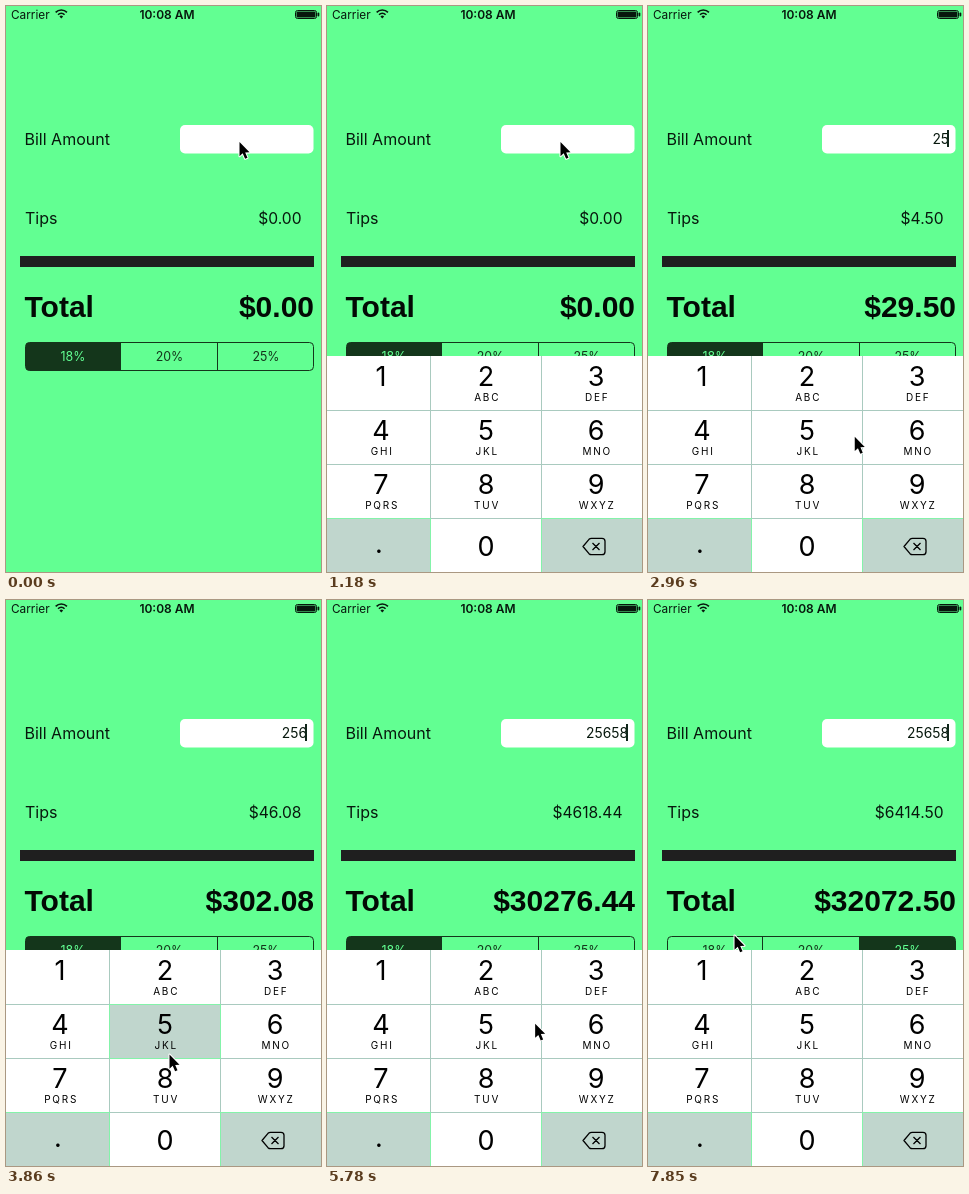
Animation of 315 by 566 pixels, one loop 7990 ms. Source, as an HTML page with a canvas:

```html
<!DOCTYPE html>
<html lang="en">
<head>
<meta charset="utf-8">
<title>Tip calculator</title>
<style>
html, body { margin: 0; width: 100%; height: 100%; overflow: hidden; background: #62ff92; }
canvas { display: block; width: 315px; height: 566px; }
</style>
</head>
<body>
<canvas id="stage" width="315" height="566"></canvas>
<script>
const W = 315, H = 566, LOOP = 7990;
const ctx = document.getElementById('stage').getContext('2d');
const SANS = 'Inter, Roboto, sans-serif';
const BOLD = '"Liberation Sans", Arial, sans-serif';
const GREEN = '#62ff92', INK = '#07180d', DARK = '#14361b', GREY = '#c0d6cd', LINE = '#a9cabf';

const KEYS = ['1', '2 ABC', '3 DEF', '4 GHI', '5 JKL', '6 MNO', '7 PQRS', '8 TUV', '9 WXYZ', '.', '0', ''];
const COLS = [0, 103, 214, 315], MIDS = [54, 159, 269];
const KB_TOP = 350, ROW = 54;

const SEG_X = [19.5, 114.5, 211.5, 307.5], SEG_MID = [67, 163.5, 260], RATES = [18, 20, 25];

// [time down, key]; the digit lands when the key is let go
const TAPS = [[2065, '2'], [2655, '5'], [3255, '6'], [3855, '5'], [4295, '8']];
const HOLD = 145;
const RATE_TAPS = [[6205, 1], [7105, 2]];

// pointer: time, x, y
const PATH = [
  [1400, 233.5, 136], [1960, 171.5, 372], [2240, 171.5, 372], [2600, 163, 430],
  [2780, 163, 430], [3180, 268, 432], [3400, 268, 432], [3690, 163.5, 454.5],
  [3980, 163.5, 454.5], [4250, 165, 487], [4430, 168, 487], [4600, 217, 488],
  [4890, 254, 518], [5180, 258, 525], [5450, 258, 525], [6050, 168, 342],
  [6230, 168, 342], [6760, 269.5, 338], [6940, 271, 345], [7090, 271, 345],
  [7700, 95.5, 335], [7850, 86.5, 335.5]
];

const STEP = 148.1, FIRST = 440;
function sample(t) {
  const n = Math.floor((t - FIRST + 10) / STEP);
  return n < 0 ? 0 : FIRST + n * STEP;
}

function pointerAt(t) {
  let a = PATH[0];
  for (const b of PATH) {
    if (t < b[0]) {
      if (a === b) break;
      const u = (t - a[0]) / (b[0] - a[0]), e = u * u * (3 - 2 * u);
      return [a[1] + (b[1] - a[1]) * e, a[2] + (b[2] - a[2]) * e];
    }
    a = b;
  }
  return [a[1], a[2]];
}

function stateAt(t) {
  const now = t + 12;
  let bill = '', pressed = null, seg = 0, typed = 590;
  for (const [down, key] of TAPS) {
    if (now >= down + HOLD) { bill += key; typed = down + HOLD; }
    else if (now >= down) pressed = key;
  }
  for (const [at, i] of RATE_TAPS) if (now >= at) seg = i;
  const slide = t < FIRST ? 216 : 216 * Math.exp(-(t - 400) / 90);
  return {
    bill, pressed, seg,
    slide: slide < 0.5 ? 0 : Math.round(slide),
    caret: t >= FIRST && (now < 590 || (now - typed) % 1040 < 575),
    pointer: pointerAt(t)
  };
}

function text(str, x, y, size, opt = {}) {
  const { weight = 400, align = 'left', color = INK, family = SANS, gap = 0 } = opt;
  ctx.font = `${weight} ${size}px ${family}`;
  ctx.textAlign = align;
  ctx.fillStyle = color;
  ctx.letterSpacing = gap + 'px';
  ctx.fillText(str, x, y);
  ctx.letterSpacing = '0px';
}

function rect(x, y, w, h, color) {
  ctx.fillStyle = color;
  ctx.fillRect(x, y, w, h);
}

function round(x, y, w, h, r) {
  ctx.beginPath();
  ctx.roundRect(x, y, w, h, r);
}

function poly(points) {
  ctx.beginPath();
  points.forEach(([x, y]) => ctx.lineTo(x, y));
  ctx.closePath();
}

function statusBar() {
  text('Carrier', 5, 12.5, 11.8);
  text('10:08 AM', 161, 12.5, 12, { weight: 600, align: 'center' });
  ctx.strokeStyle = INK;
  ctx.lineWidth = 1.6;
  for (const r of [4.6, 8]) {
    ctx.beginPath();
    ctx.arc(55.3, 12, r, -Math.PI * 0.75, -Math.PI * 0.25);
    ctx.stroke();
  }
  ctx.fillStyle = INK;
  ctx.beginPath();
  ctx.moveTo(55.3, 12.6);
  ctx.arc(55.3, 12, 2.4, -Math.PI * 0.78, -Math.PI * 0.22);
  ctx.fill();
  ctx.lineWidth = 1;
  round(289.5, 4.5, 21, 8, 2);
  ctx.stroke();
  round(290.5, 5.5, 19, 6, 1);
  ctx.fill();
  round(311.5, 6.5, 1.8, 4, 1);
  ctx.fill();
}

function segments(seg) {
  ctx.save();
  round(19.5, 336.5, 288, 28, 4);
  ctx.clip();
  rect(SEG_X[seg], 336, SEG_X[seg + 1] - SEG_X[seg], 29, DARK);
  ctx.restore();
  ctx.strokeStyle = DARK;
  ctx.lineWidth = 1;
  round(19.5, 336.5, 288, 28, 4);
  ctx.stroke();
  rect(114, 336, 1, 29, DARK);
  rect(211, 336, 1, 29, DARK);
  RATES.forEach((r, i) => text(r + '%', SEG_MID[i], 355, 12.4,
    { align: 'center', color: i === seg ? GREEN : DARK }));
}

function form(s) {
  const cents = Math.round(Number(s.bill) * RATES[s.seg]);
  const money = c => '$' + (c / 100).toFixed(2);
  text('Bill Amount', 18.5, 139, 16);
  ctx.fillStyle = '#fff';
  round(174, 119, 133.5, 28.5, 5);
  ctx.fill();
  text(s.bill, 301, 138, 13.8, { align: 'right' });
  if (s.caret) rect(299, 124, 2, 17, '#10261a');
  text('Tips', 19, 217.5, 16);
  text(money(cents), 295.5, 217.5, 15.6, { align: 'right' });
  rect(14, 250, 294, 11, '#1f1f1f');
  const big = { weight: 700, family: BOLD, color: '#030a05' };
  text('Total', 18.5, 311, 30, big);
  text(money(Number(s.bill) * 100 + cents), 308, 311, 30, { ...big, align: 'right' });
  segments(s.seg);
}

function eraseIcon(y) {
  ctx.strokeStyle = '#000';
  ctx.lineWidth = 1.3;
  ctx.lineJoin = 'round';
  ctx.beginPath();
  ctx.moveTo(256, y);
  ctx.lineTo(262, y - 7.2);
  ctx.quadraticCurveTo(263, y - 8.2, 264.5, y - 8.2);
  ctx.arcTo(278, y - 8.2, 278, y, 3);
  ctx.arcTo(278, y + 8.2, 264, y + 8.2, 3);
  ctx.lineTo(264.5, y + 8.2);
  ctx.quadraticCurveTo(263, y + 8.2, 262, y + 7.2);
  ctx.closePath();
  ctx.moveTo(265.5, y - 3.5);
  ctx.lineTo(272.5, y + 3.5);
  ctx.moveTo(272.5, y - 3.5);
  ctx.lineTo(265.5, y + 3.5);
  ctx.stroke();
}

function keyboard(s) {
  if (s.slide >= 216) return;
  const top = KB_TOP + s.slide;
  rect(0, top, W, H - top, '#fff');
  for (let r = 1; r < 4; r++) rect(0, top + r * ROW, W, 1, LINE);
  rect(103, top, 1, H, LINE);
  rect(214, top, 1, H, LINE);
  KEYS.forEach((key, i) => {
    const [digit, letters] = key.split(' ');
    const c = i % 3, x = COLS[c], y = top + Math.floor(i / 3) * ROW, mid = MIDS[c];
    if (i === 9 || i === 11 || digit === s.pressed) {
      const w = COLS[c + 1] - x;
      rect(x, y, w + 1, ROW + 1, '#84f3aa');
      rect(c ? x + 1 : 0, y + 1, c ? w - 1 : w, ROW - 1, GREY);
    }
    if (i === 11) eraseIcon(y + 28.5);
    else if (i === 9) text('.', 52, y + 35, 27, { align: 'center', color: '#000' });
    else text(digit, mid, y + (i > 9 ? 37.5 : 29.5), 27, { align: 'center', color: '#000' });
    if (letters) text(letters, mid + 1.2, y + 45.2, 10, { align: 'center', color: '#000', gap: 1.8 });
  });
}

function pointer([x, y]) {
  ctx.save();
  ctx.translate(x, y);
  poly([[0, 0], [0, 14.2], [3.2, 11.3], [5.6, 16.8], [8, 15.8], [5.7, 10.4], [10, 10.2]]);
  ctx.lineJoin = 'round';
  ctx.lineWidth = 2;
  ctx.strokeStyle = '#fff';
  ctx.stroke();
  ctx.fillStyle = '#000';
  ctx.fill();
  ctx.restore();
}

function draw(t) {
  const s = stateAt(sample(t));
  rect(0, 0, W, H, GREEN);
  statusBar();
  form(s);
  keyboard(s);
  pointer(s.pointer);
}

const start = performance.now();
function tick() {
  draw((performance.now() - start) % LOOP);
  requestAnimationFrame(tick);
}
tick();
</script>
</body>
</html>
```
